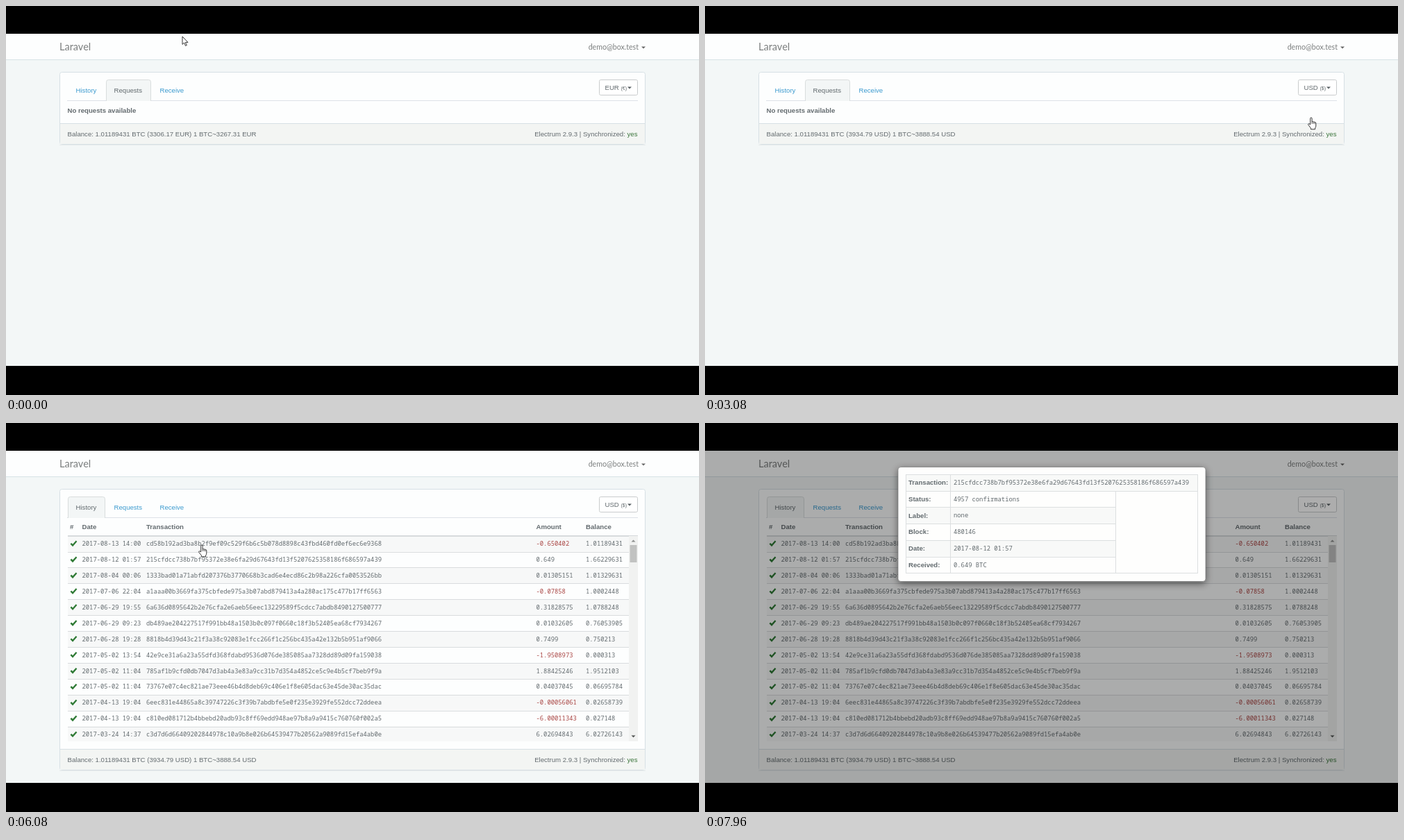
An HTML page that plays this animation: 998 px wide and 561 px high, repeating every 8000 ms.

```html
<!DOCTYPE html>
<html lang="en">
<head>
<meta charset="utf-8">
<title>Wallet</title>
<style>
  html, body { margin: 0; width: 100%; height: 100%; overflow: hidden; background: #000; }
  svg { display: block; width: 100vw; height: 100vh; }
  text { font: 9.62px "Liberation Sans", Arial, sans-serif; fill: #636b6f; white-space: pre; }
  .bold { font-weight: 700; }
  .mono { font: 8.83px "Noto Sans Mono", monospace; }
  .brand { font: 14.5px Lato, sans-serif; fill: #7c7f7f; }
  .account { font: 10.6px Lato, sans-serif; fill: #7c7f7f; }
  .small { font-size: 7.2px; }
  .link { fill: #3d9bcf; }
  .good { fill: #3c763d; }
  .bad { fill: #a94442; }

  .eur, .usd, .requests, .history, .menu, .pressed, .arrow, .hand { animation: 8s step-end infinite; }
  .eur { animation-name: eur; }
  .usd { animation-name: usd; }
  .requests { animation-name: requests; }
  .history { animation-name: history; }
  .menu { animation-name: menu; }
  .pressed { animation-name: pressed; }
  .arrow { animation-name: arrow; }
  .hand { animation-name: hand; }
  @keyframes eur { 0% { opacity: 1 } 38.5%, 100% { opacity: 0 } }
  @keyframes usd { 0% { opacity: 0 } 38.5%, 100% { opacity: 1 } }
  @keyframes requests { 0% { opacity: 1 } 63%, 100% { opacity: 0 } }
  @keyframes history { 0% { opacity: 0 } 63%, 100% { opacity: 1 } }
  @keyframes menu { 0% { opacity: 0 } 30.5% { opacity: 1 } 38.5%, 100% { opacity: 0 } }
  @keyframes pressed { 0% { opacity: 0 } 27.25% { opacity: 1 } 38.5%, 100% { opacity: 0 } }
  @keyframes hand {
    0% { opacity: 0 } 27.25% { opacity: 1 } 39.5% { opacity: 0 }
    60.5% { opacity: 1 } 87%, 100% { opacity: 0 }
  }
  @keyframes arrow {
    0% { opacity: 1 } 27.25% { opacity: 0 } 39.5% { opacity: 1 }
    60.5% { opacity: 0 } 87%, 100% { opacity: 1 }
  }

  .fade { animation: fade 8s linear infinite; }
  .slide { animation: slide 8s linear infinite; filter: drop-shadow(0 3.7px 5.5px rgba(0, 0, 0, .5)); }
  .cursor { animation: move 8s ease-in-out infinite; }
  @keyframes fade { 0%, 86.14% { opacity: 0 } 88%, 100% { opacity: 1 } }
  @keyframes slide {
    0% { transform: translateY(-41px) }
    86.14% { transform: translateY(-41px); animation-timing-function: ease-out }
    89.89%, 100% { transform: none }
  }
  @keyframes move {
    0%, 2% { transform: translate(254px, 44px) }
    11% { transform: translate(330px, 150px) }
    21% { transform: translate(560px, 186px) }
    27.8%, 31% { transform: translate(869px, 112px) }
    35%, 38.5% { transform: translate(873px, 161px); animation-timing-function: ease-in }
    46.5% { transform: translate(435px, 240px); animation-timing-function: ease-out }
    59% { transform: translate(105px, 138px) }
    62%, 65% { transform: translate(114px, 122px) }
    75%, 77% { transform: translate(282px, 176px) }
    84%, 90.5% { transform: translate(320px, 193px) }
    94.5%, 100% { transform: translate(480px, 535px) }
  }
</style>
</head>
<body>
<script>
const rect = (x, y, w, h, fill, extra = "") =>
  `<rect x="${x}" y="${y}" width="${w}" height="${h}" fill="${fill}" ${extra}/>`;
const box = (x, y, w, h, fill, stroke, r = 3) =>
  rect(x + .5, y + .5, w - 1, h - 1, fill, `stroke="${stroke}" rx="${r}"`);
const text = (x, y, str, cls = "", extra = "") =>
  `<text x="${x}" y="${y}" class="${cls}" ${extra}>${str}</text>`;
const group = (cls, ...parts) => `<g class="${cls}">${parts.join("")}</g>`;
const path = (d, fill, extra = "") => `<path d="${d}" fill="${fill}" ${extra}/>`;
const caret = (x, y, fill) => path(`M${x} ${y}h6l-3 3z`, fill);
const END = 'text-anchor="end"';

const TABS = [["History", 89, 53], ["Requests", 144, 64], ["Receive", 210, 57]];
const MONEY = {
  eur: ["EUR", "€", "3306.17", "3267.31"],
  usd: ["USD", "$", "3934.79", "3888.54"],
};
const ROWS = [
  ["2017-08-13 14:00", "cd58b192ad3ba8b2f9ef09c529f6b6c5b078d8898c43fbd460fd0ef6ec6e9368", "-0.650402", "1.01189431"],
  ["2017-08-12 01:57", "215cfdcc738b7bf95372e38e6fa29d67643fd13f5207625358186f686597a439", "0.649", "1.66229631"],
  ["2017-08-04 00:06", "1333bad01a71abfd207376b3770668b3cad6e4ecd86c2b98a226cfa0053526bb", "0.01305151", "1.01329631"],
  ["2017-07-06 22:04", "a1aaa00b3669fa375cbfede975a3b07abd879413a4a280ac175c477b17ff6563", "-0.07858", "1.0002448"],
  ["2017-06-29 19:55", "6a636d0895642b2e76cfa2e6aeb56eec13229589f5cdcc7abdb8490127500777", "0.31828575", "1.0788248"],
  ["2017-06-29 09:23", "db489ae204227517f991bb48a1503b0c097f0660c18f3b52405ea68cf7934267", "0.01032605", "0.76053905"],
  ["2017-06-28 19:28", "8818b4d39d43c21f3a38c92083e1fcc266f1c256bc435a42e132b5b951af9066", "0.7499", "0.750213"],
  ["2017-05-02 13:54", "42e9ce31a6a23a55dfd368fdabd9536d076de385085aa7328dd89d09fa159038", "-1.9508973", "0.000313"],
  ["2017-05-02 11:04", "785af1b9cfd0db7047d3ab4a3e83a9cc31b7d354a4852ce5c9e4b5cf7beb9f9a", "1.88425246", "1.9512103"],
  ["2017-05-02 11:04", "73767e07c4ec821ae73eee46b4d8deb69c406e1f8e605dac63e45de30ac35dac", "0.04037045", "0.06695784"],
  ["2017-04-13 19:04", "6eec831e44865a8c39747226c3f39b7abdbfe5e0f235e3929fe552dcc72ddeea", "-0.00056061", "0.02658739"],
  ["2017-04-13 19:04", "c810ed081712b4bbebd20adb93c8ff69edd948ae97b8a9a9415c760760f002a5", "-6.00011343", "0.027148"],
  ["2017-03-24 14:37", "c3d7d6d66409202844978c10a9b8e026b64539477b20562a9089fd15efa4ab0e", "6.02694843", "6.02726143"],
];

function balance(key, y) {
  const [code, , total, rate] = MONEY[key];
  return group(key, text(88.5, y, `Balance: 1.01189431 BTC (${total} ${code}) 1 BTC~${rate} ${code}`));
}

function panel(active, bottom) {
  const foot = bottom - 31;
  const tabs = TABS.map(([name, x, w], i) => i === active
    ? path(`M${x}.5 137V109.5q0-3 3-3h${w - 6}q3 0 3 3V137`, "#f3f6f6", 'stroke="#d9dddd"')
      + text(x + 11.5, 125, name)
    : text(x + 11.5, 125, name, "link"));
  return box(77, 95, 844, bottom - 95, "#fdfefe", "#d7e0e5")
    + rect(78, foot, 842, 30, "#f3f5f3")
    + rect(78, foot, 842, 1, "#d7e0e5")
    + rect(77, bottom, 844, 1, "#000", 'opacity=".05"')
    + rect(88, 136, 822, 1, "#dde1e8")
    + tabs.join("")
    + balance("eur", foot + 18.7) + balance("usd", foot + 18.7)
    + text(909.5, foot + 18.7, 'Electrum 2.9.3 | Synchronized: <tspan class="good">yes</tspan>', "", END);
}

function tableRow([date, id, amount, total], i) {
  const top = 162.6 + i * 22.92, y = top + 14.6;
  const sign = amount[0] === "-" ? "bad" : "";
  return (i % 2 ? "" : rect(89, top, 808, 22.9, "#f7f8f8"))
    + rect(89, Math.round(top), 808, 1, "#d9dcde")
    + path(`M92.5 ${top + 12}l1.7-1.7 1.9 1.8 4.6-5.1 1.7 1.5-6.3 7.2z`, "#2f7a35")
    + text(109.5, y, date, "mono") + text(202, y, id, "mono")
    + text(763.5, y, amount, "mono " + sign) + text(835, y, total, "mono");
}

function historyTable() {
  const heads = [["#", 92], ["Date", 109.5], ["Transaction", 202], ["Amount", 763.5], ["Balance", 835]];
  return heads.map(([name, x]) => text(x, 153, name, "bold")).join("")
    + `<g clip-path="url(#list)">${ROWS.map(tableRow).join("")}</g>`
    + rect(89, 162, 821, 1, "#d5d9db")
    + rect(897, 163, 13, 296, "#f1f2f1")
    + rect(898.5, 176, 10, 25, "#c1c2c1")
    + path("M900.5 171.5h6l-3-3z", "#8b8d8c")
    + path("M900.5 450.5h6l-3 3z", "#505252");
}

function currency(key, x, y) {
  const [code, sign] = MONEY[key];
  return text(x, y, `${code} <tspan class="small">(${sign})</tspan>`);
}

function currencyButton() {
  return box(854, 106, 56, 23, "#fff", "#c9cccd", 2)
    + group("pressed", box(854, 106, 56, 23, "#e2e3e2", "#adadad", 2))
    + group("eur", currency("eur", 862.5, 121)) + group("usd", currency("usd", 862.5, 121))
    + caret(895, 116.5, "#555d60")
    + group("menu",
      rect(849, 133, 62, 48, "#000", 'opacity=".1" rx="3"'),
      box(848, 130, 62, 48, "#fff", "#c9cccd"),
      rect(849, 154, 60, 20, "#f3f5f5"),
      currency("eur", 863, 147.5), currency("usd", 863, 167.5));
}

function modal() {
  const fields = [
    ["Transaction:", ROWS[1][1]], ["Status:", "4957 confirmations"], ["Label:", "none"],
    ["Block:", "480146"], ["Date:", ROWS[1][0]], ["Received:", "0.649 BTC"],
  ];
  const lines = fields.map(([label, value], i) => {
    const y = 74 + i * 23.7;
    return (i % 2 ? "" : rect(289, y, i ? 302 : 421, 23.7, "#f8f9f8"))
      + rect(289, Math.round(y), i > 1 ? 302 : 421, 1, "#dcdfe0")
      + text(293, y + 15.2, label, "bold") + text(358, y + 15, value, "mono");
  });
  return rect(278, 63.5, 443, 165, "#fefefd", 'rx="4" stroke="#777" stroke-width=".7"')
    + lines.join("")
    + rect(353, 74, 1, 143, "#dcdfe0") + rect(591, 98, 1, 119, "#dcdfe0")
    + box(289, 74, 421, 143, "none", "#dcdfe0", 0);
}

const outline = 'stroke="#222" stroke-width=".9" stroke-linejoin="round"';
const arrow = path("M0 0V11.4L2.6 9 4.5 13.4 6.3 12.6 4.4 8.4H8z", "#fff", outline);
const hand = path("M-1.3 10V1.2a1.2 1.2 0 0 1 2.4 0V6q1.1-1 2 .2 1.2-.7 1.9.5 1.6-.4 1.8 1.2V12"
  + "q0 1.6-1.2 3v1.8H-.5V15.2L-4.2 10.4q-.5-1.5.9-1.7z", "#fff", outline)
  + path("M1.1 6v3M3.1 6.5V9M5 7v2.3", "none", 'stroke="#222" stroke-width=".7"');

document.body.innerHTML = `<svg viewBox="0 0 998 561" preserveAspectRatio="none">
  <clipPath id="list"><rect x="88" y="162" width="822" height="297"/></clipPath>`
  + rect(0, 40, 998, 479, "#f3f7f7")
  + rect(0, 40, 998, 38, "#fdfefe") + rect(0, 77, 998, 1, "#d7e2e6")
  + text(77, 63.5, "Laravel", "brand")
  + text(911, 62.5, "demo@box.test", "account", END) + caret(915, 58.5, "#666")
  + group("requests", panel(1, 200), text(88.5, 153.6, "No requests available", "bold"))
  + group("history", panel(0, 501), historyTable())
  + currencyButton()
  + group("fade", rect(0, 40, 998, 479, "#000", 'opacity=".32"'), group("slide", modal()))
  + group("cursor", group("arrow", arrow), group("hand", hand))
  + rect(0, 0, 998, 40, "#000") + rect(0, 519, 998, 42, "#000")
  + "</svg>";
</script>
</body>
</html>
```
